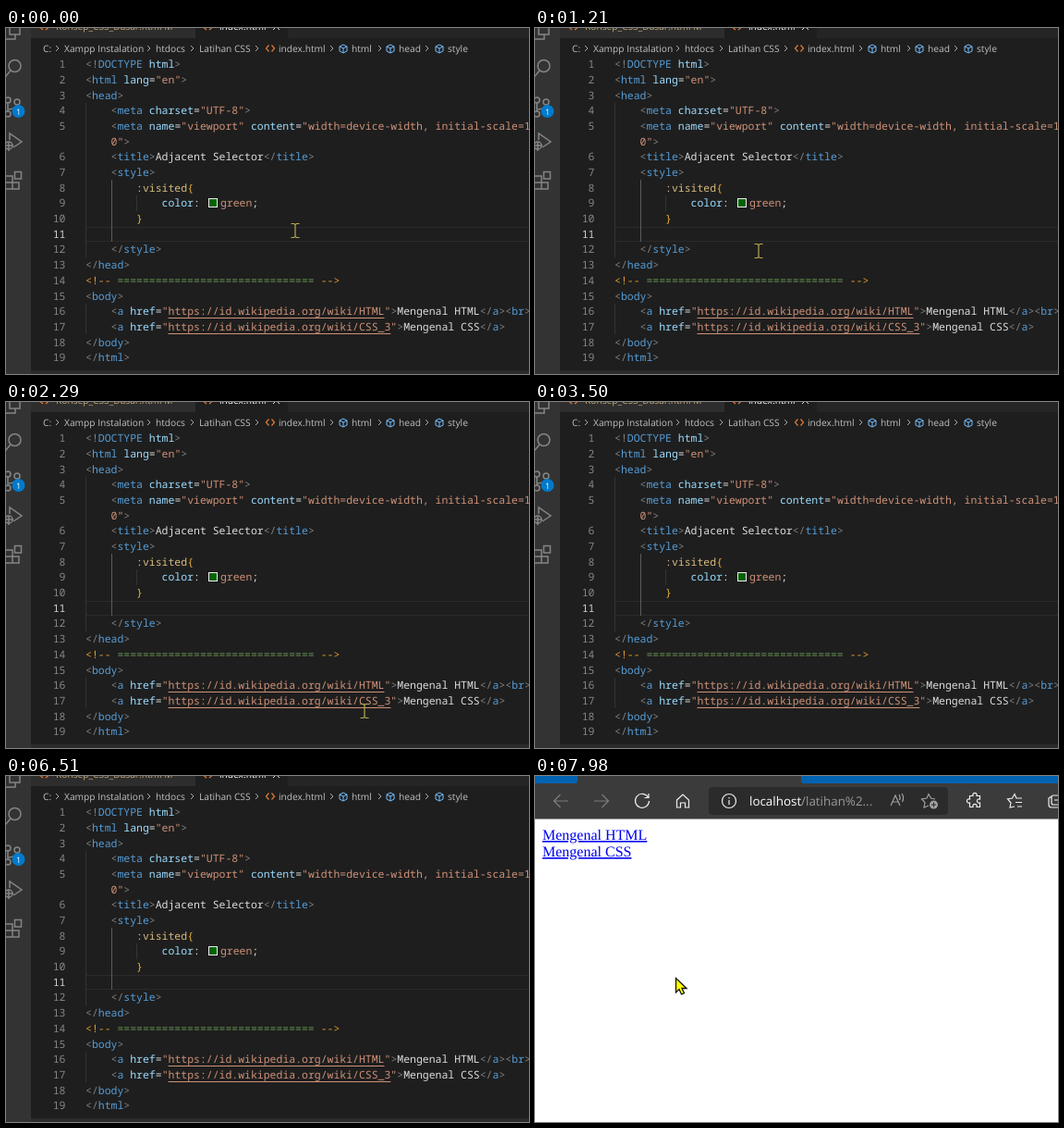
An HTML page that plays this animation: 566 by 374 pixels, repeating every 8 s.

```html
<!DOCTYPE html>
<html lang="en">
<head>
<meta charset="UTF-8">
<title>Editor and browser</title>
<style>
html, body { margin: 0; width: 100%; height: 100%; overflow: hidden; background: #1e1e1e; }
#stage { position: relative; width: 566px; height: 374px; overflow: hidden; text-rendering: geometricPrecision; }
svg, pre { position: absolute; left: 0; top: 0; margin: 0; }
pre { top: 32.2px; font: 500 11.47px/16.68px "Noto Sans Mono", monospace; color: #dcdcdc; }
#numbers { width: 64.5px; text-align: right; color: #858585; }
#numbers b { font-weight: inherit; color: #d0d0d0; }
#code { left: 86px; }
.ui { font-family: "Open Sans", sans-serif; }
.comment { color: #e0982f; }
.rule { color: #6a9955; }
.tag { color: #569cd6; }
.attr { color: #9cdcfe; }
.url { color: #ce9178; text-decoration: underline 1px; text-underline-offset: 3px; }
.string { color: #ce9178; }
.selector { color: #d7ba7d; }
.brace { color: #e8b03a; }
.bracket { color: #808080; }
.swatch { display: inline-block; box-sizing: border-box; width: 10px; height: 10px; margin: 0 3.2px 0 2px;
  border: 1px solid #eee; background: #006400; vertical-align: -1px; }
</style>
</head>
<body>
<div id="stage">
  <div id="editor">
    <svg width="566" height="374" fill="none">
      <path fill="#333" d="M0 0h27v374H0z"/>
      <path fill="#252526" d="M27 0h539v11H27z"/>
      <path fill="#2d2d2d" d="M27 0h178v11H27z"/>
      <path fill="#1e1e1e" d="M205 0h100v12H205z"/>
      <path fill="#2b2b2b" d="M27 370h539v4H27z"/>
      <path stroke="#2a2a2a" d="M87 215.500H566M87 230.500H566"/>
      <path stroke="#343434" d="M86.500 81V248M86.500 298V331M141.500 181V198"/>
      <path stroke="#5c5c5c" d="M114.500 164V231"/>
      <g stroke="#858585" stroke-width="1.500">
        <path d="M4 0V7H15V0M0 12H10V7"/>
        <circle cx="9.500" cy="41" r="6.500"/>
        <path d="M5 46L-1 53"/>
        <circle cx="2" cy="78" r="3"/><circle cx="12" cy="80" r="3"/><circle cx="2" cy="93" r="3"/>
        <path d="M2 81V90M12 83Q12 87 3 88"/>
        <path d="M4 121V114L17 123L8 129"/>
        <circle cx="3" cy="127" r="4"/><path d="M-2 127H8M3 123V133"/>
        <path d="M0 160H7V174H0M0 167H14V174H7M9.500 155.500H16.500V163H9.500Z"/>
      </g>
      <circle cx="13.500" cy="90" r="7" fill="#007acc"/>
      <g class="ui" font-size="10.2">
        <text x="11" y="93.500" font-size="9" fill="#fff">1</text>
        <text x="54" y="2" fill="#c4a878">Konsep_CSS_Dasar.html M</text>
        <text x="231" y="2" fill="#fff">index.html</text>
        <g id="crumbs" fill="#c0c0c0"></g>
      </g>
      <path stroke="#ddd" d="M289 -5L296 2M296 -5L289 2"/>
      <path stroke="#e37933" stroke-width="1.200" d="M40 -5L36.500 -1L40 2M43 -5L46.500 -1L43 2M217 -5L213.500 -1L217 2M220 -5L223.500 -1L220 2M284.500 18.500L281.500 22L284.500 25.500M287.500 18.500L290.500 22L287.500 25.500"/>
      <path id="chevrons" stroke="#aaa"/>
      <path id="symbols" stroke="#75beff"/>
    </svg>
    <pre id="numbers"></pre>
    <pre id="code"></pre>
    <svg width="566" height="374" fill="none">
      <path id="caret" stroke="#aeafad" d="M86.500 215V231"/>
      <path id="beam" stroke="#b9a94e" stroke-width="1.200" d="M-4.500 -7.500H-1.500L0 -6.500L1.500 -7.500H4.500M0 -6.500V6.500M-4.500 7.500H-1.500L0 6.500L1.500 7.500H4.500"/>
    </svg>
  </div>
  <svg id="browser" width="566" height="374" fill="none">
    <path fill="#fff" d="M0 0H566V374H0z"/>
    <path id="frame" d="M0 0H566V12H0z"/>
    <path fill="#3b3b3b" d="M0 8H43Q46 8 46 5V0H288V5Q288 8 291 8H566V46.500H0z"/>
    <rect x="188" y="12" width="259" height="30" rx="4" fill="#2b2b2b"/>
    <g stroke="#7d7d7d" stroke-width="1.200">
      <path d="M36 27H20.500M27.500 20L20.500 27L27.500 34M64 27H79.500M72.500 20L79.500 27L72.500 34"/>
      <path stroke="#a0a0a0" d="M385 32L390 21L395 32M387 28H393M394 20Q396 23 394.500 26M397 19Q400 23 397.500 28"/>
    </g>
    <g stroke="#eee" stroke-width="1.200">
      <path d="M122.500 23A7.500 7.500 0 1 0 123.500 27M123 19V23.500H118.500"/>
      <path d="M153.500 26L160 20L166.500 26V34H162.500V29H157.500V34H153.500Z"/>
      <circle cx="210" cy="27" r="7.500"/><path d="M210 26V31M210 23V24.500"/>
      <path d="M470.500 21.500H474A2.200 2.200 0 1 1 478 21.500H481.500V25A2.200 2.200 0 1 0 481.500 29V33.500H478A2.200 2.200 0 1 0 474 33.500H470.500V29A2.200 2.200 0 1 1 470.500 25Z"/>
      <path d="M519 33L514 34L515 29L511.500 25L516.500 24L519 19.500L521 24H527M520 28.500H527M522 33H527"/>
      <path d="M566 31H561Q559 31 559 29V23Q559 21 561 21H566M559 22L556 24V31Q556 34 559 34H566M562 26H566"/>
    </g>
    <path stroke="#a0a0a0" stroke-width="1.200" d="M426 32L421 34L422 28.500L418.500 25L424 24L426 19.500L428.500 24L433 25"/>
    <circle cx="431.500" cy="31" r="4.500" fill="#a0a0a0"/><path stroke="#2b2b2b" d="M429 31H434M431.500 28.500V33.500"/>
    <text class="ui" x="232" y="32" font-size="13.4" fill="#fff">localhost<tspan fill="#9a9a9a">/latihan%2...</tspan></text>
    <g font-family="Liberation Serif, serif" font-size="16" fill="#00e" text-decoration="underline">
      <text x="8" y="69">Mengenal HTML</text>
      <text x="8" y="87">Mengenal CSS</text>
    </g>
    <path id="arrow" fill="#ff0" stroke="#111" stroke-width="1.300" d="M.5 .5V16L4 12.500L6.500 18L9.500 16.700L7 11.500H12Z"/>
  </svg>
</div>
<script>
const byId = id => document.getElementById(id);
const source = `<!DOCTYPE html>
<html lang="en">
<head>
    <meta charset="UTF-8">
    <meta name="viewport" content="width=device-width, initial-scale=1.
    0">
    <title>Adjacent Selector</title>
    <style>
        :visited{
            color: green;
        }

    </style>
</head>
<!-- =============================== -->
<body>
    <a href="https://id.wikipedia.org/wiki/HTML">Mengenal HTML</a><br>
    <a href="https://id.wikipedia.org/wiki/CSS_3">Mengenal CSS</a>
</body>
</html>`;

const tokens = new RegExp([
  '(?<comment><!--|-->)', '(?<rule>={3,})', '(?<tag>(?<=<[/!]?)\\w+)',
  '(?<attr>\\w+(?==")|html(?=>)|color(?=:))', '(?<url>https:[^"]+)',
  '(?<string>"(?=https)|0"|"[^">]*"?|green)', '(?<selector>:visited)',
  '(?<brace>[{}])', '(?<bracket><[/!]?|>)'
].join('|'), 'g');

byId('code').innerHTML = source.replace(tokens, (token, ...rest) => {
  const kind = Object.entries(rest.at(-1)).find(([, match]) => match !== undefined)[0];
  const text = token.replace(/</g, '&lt;').replace(/>/g, '&gt;');
  const swatch = token === 'green' ? '<i class="swatch"></i>' : '';
  return `${swatch}<span class="${kind}">${text}</span>`;
});

// The fifth line wraps, so the row below it has no number.
byId('numbers').innerHTML = Array.from({ length: 19 }, (_, i) => i + 1)
  .map(n => n === 11 ? '<b>11</b>' : n === 5 ? '5\n' : n).join('\n');

const crumbs = [['C:', 40], ['Xampp Instalation', 63], ['htdocs', 162], ['Latihan CSS', 209],
  ['index.html', 295], ['html', 374], ['head', 425], ['style', 478]];
byId('crumbs').innerHTML = crumbs.map(([name, x]) => `<text x="${x}" y="26">${name}</text>`).join('');
byId('chevrons').setAttribute('d', [54, 153, 200, 270, 351, 403, 454].map(x => `M${x} 19l3 3l-3 3`).join(''));
byId('symbols').setAttribute('d', [361, 412, 465]
  .map(x => `M${x} 20l4 -2l4 2v5l-4 2l-4 -2zl4 2l4 -2m-4 2v5`).join(''));

const LOOP = 8000, STEP = 68.3;
const beamPath = [[110, 313, 219], [520, 152, 131], [720, 186, 159], [930, 230, 193], [1130, 255, 225],
  [1480, 193, 300], [1620, 196, 316], [1750, 214, 314], [2570, 474, 344]];

function beamAt(time) {
  if (time >= 3430) return [433, 365];
  const step = Math.min(35, Math.floor((time - 172) / STEP));
  const t = step < 0 ? 110 : 180 + step * STEP;
  const next = beamPath.findIndex(point => point[0] > t);
  if (next < 0) return beamPath.at(-1).slice(1);
  const [t0, x0, y0] = beamPath[next - 1], [t1, x1, y1] = beamPath[next];
  const part = (t - t0) / (t1 - t0);
  return [Math.round(x0 + (x1 - x0) * part), Math.round(y0 + (y1 - y0) * part)];
}

const show = (id, visible) => { byId(id).style.display = visible ? '' : 'none'; };
const move = (id, [x, y]) => byId(id).setAttribute('transform', `translate(${x} ${y})`);

function draw(time) {
  show('editor', time < 6640);
  show('browser', time >= 6640);
  show('beam', time < 3500);
  move('beam', beamAt(time));
  show('caret', time >= 5850 && time < 6310);
  byId('frame').setAttribute('fill', time < 6710 ? '#2477bb' : '#0063b1');
  show('arrow', time >= 7840);
  move('arrow', time < 7910 ? [162, 237] : time < 7980 ? [156, 226] : [152, 218]);
}

const start = performance.now();
function tick() {
  draw((performance.now() - start) % LOOP);
  requestAnimationFrame(tick);
}
tick();
</script>
</body>
</html>
```
